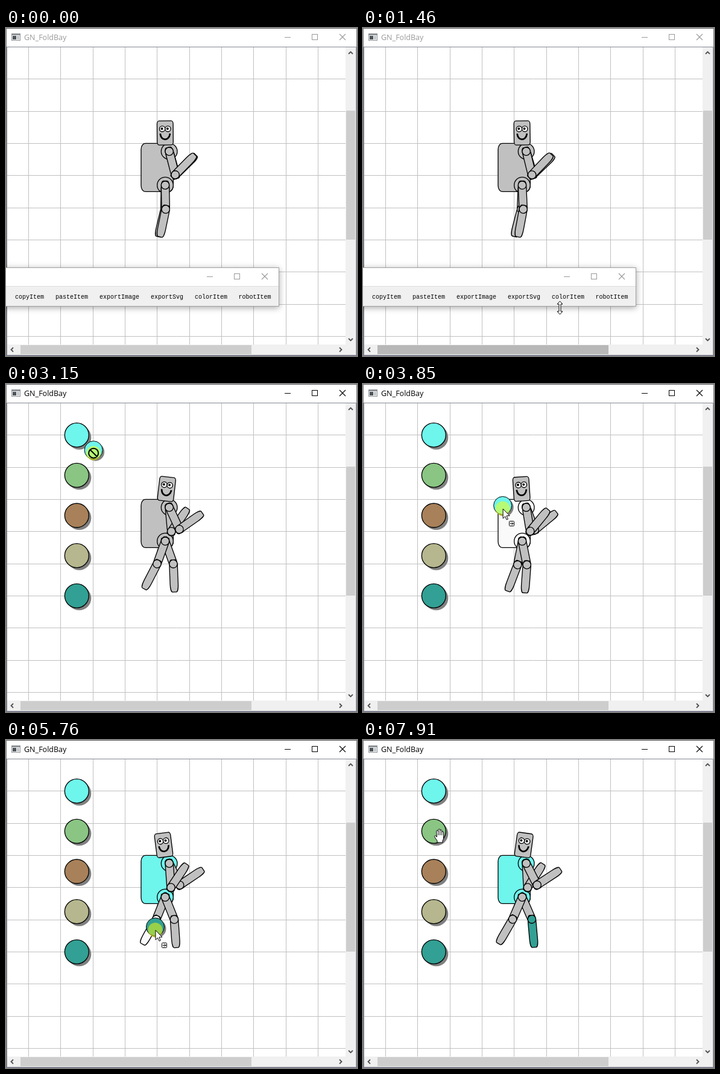
An HTML page with a canvas for the animation above (7.99 s loop, 582 px wide and 544 px high).

```html
<!DOCTYPE html>
<html lang="en">
<head>
<meta charset="utf-8">
<title>Robot</title>
<style>
html, body { margin: 0; width: 100%; height: 100%; overflow: hidden; background: #fff; }
canvas { display: block; width: 582px; height: 544px; }
</style>
</head>
<body>
<canvas id="stage"></canvas>
<script>
const W = 582, H = 544, LOOP = 7990, STEP = 76.83;
const TAU = Math.PI * 2, SCALE = 4 / 3, CX = 250.667, CY = 218;
const GREY = '#c0c0c0', LIT = '#fafafa';
const PALETTE = ['#6ef5ec', '#8ac584', '#a8815a', '#b6b78e', '#32a094'];
const T = { click: 1900, colors: 2000, front: 2850, drag1: 3000, drop1: 4010,
            press2: 5120, drag2: 5250, drop2: 5880 };

// time, walk cycles
const WALK = [[0, -1.756], [1460, -.763], [2540, -.03], [3850, .816],
              [5760, 2.1175], [7060, 3.02], [7910, 3.605], [7990, 3.66]];
// time, pointer x, pointer y
const POINTER = [[980, 300, 565], [1150, 310, 535], [1300, 322, 480], [1460, 326.5, 464],
  [1650, 328, 462], [1850, 340, 447], [2050, 340, 447], [2540, 138, 198], [2850, 122, 92],
  [3000, 120, 88], [3400, 187, 159], [3850, 232.5, 207.5], [4220, 232.5, 212], [4950, 120, 355],
  [5200, 120, 355], [5700, 247, 314], [5760, 247.5, 315], [5850, 247.5, 315], [5960, 231, 319],
  [6830, 231, 319], [7600, 146, 116], [7750, 123, 103], [7910, 126, 156]];

const HAND = new Path2D('M5 23L5 20L1.5 15Q-.5 12 1.5 11.5Q3 11.5 4.5 14L3.8 5Q3.8 2.8 5.2 2.8Q6.6 2.8 6.8 5' +
  'L6.8 2.5Q7 .7 8.3 .7Q9.7 .7 9.7 2.5L9.9 3.5Q10 1.8 11.2 1.8Q12.7 1.8 12.7 4L12.8 6Q13 4.6 14.2 4.6' +
  'Q15.6 4.6 15.6 7L15.6 15Q15.5 18 14 20L14 23Z');
const FINGERS = new Path2D('M6.9 5V11M9.8 3.5V11M12.8 6V11');
const ARROW = new Path2D('M.5 .5V16.5L4 13L6.5 18.5L8.8 17.5L6.4 12H11.5Z');
const RESIZE = new Path2D('M0 -11L4.5 -6H1.5V6H4.5L0 11L-4.5 6H-1.5V-6H-4.5Z');

const canvas = document.getElementById('stage');
const ctx = canvas.getContext('2d');
const dpr = window.devicePixelRatio || 1;
canvas.width = W * dpr;
canvas.height = H * dpr;

const mix = (a, b, k) => a + (b - a) * k;
const clamp = v => Math.max(0, Math.min(1, v));

function sample(keys, t) {
  let i = 0;
  while (i < keys.length - 2 && keys[i + 1][0] <= t) i++;
  const a = keys[i], b = keys[i + 1], k = clamp((t - a[0]) / (b[0] - a[0]));
  return a.slice(1).map((v, j) => mix(v, b[j + 1], k));
}

function rect(x, y, w, h, color) {
  ctx.fillStyle = color;
  ctx.fillRect(x, y, w, h);
}

function lines(color, width, ...paths) {
  ctx.strokeStyle = color;
  ctx.lineWidth = width;
  ctx.beginPath();
  for (const p of paths)
    for (let i = 0; i < p.length; i += 2) ctx[i ? 'lineTo' : 'moveTo'](p[i], p[i + 1]);
  ctx.stroke();
}

function oval(x, y, r, fill, stroke = true) {
  ctx.beginPath();
  ctx.arc(x, y, r, 0, TAU);
  ctx.fillStyle = fill;
  ctx.fill();
  if (stroke) ctx.stroke();
}

function box(x, y, w, h, rx, ry, fill) {
  ctx.beginPath();
  ctx.roundRect(x, y, w, h, { x: rx, y: ry });
  ctx.fillStyle = fill;
  ctx.fill();
  ctx.stroke();
}

function placed(x, y, angle, draw) {
  ctx.save();
  ctx.translate(x, y);
  ctx.rotate(angle * Math.PI / 180);
  draw();
  ctx.restore();
}

function blackPen() {
  ctx.strokeStyle = '#000';
  ctx.lineWidth = 1;
}

function windowButtons(x, y, color) {
  lines(color, 1, [x, y + .5, x + 10, y + .5]);
  ctx.strokeRect(x + 45.5, y - 4.5, 9, 9);
  lines(color, 1.1, [x + 91, y - 5, x + 101, y + 5], [x + 101, y - 5, x + 91, y + 5]);
}

function frame(active, hover) {
  rect(0, 0, W, H, '#fff');
  rect(9, 9, 15, 12, '#8c9196');
  rect(10, 12, 13, 8, '#f4f4f4');
  rect(11, 13, 6, 6, '#4c5358');
  rect(18, 13, 4, 6, '#c4c8cc');
  ctx.font = '12.5px "Open Sans", sans-serif';
  ctx.fillStyle = active ? '#000' : '#999';
  ctx.fillText('GN_FoldBay', 30, 20);
  windowButtons(462, 15, active ? '#000' : '#999');

  ctx.beginPath();
  for (let x = 37; x < 563; x += 160 / 3) { ctx.moveTo(Math.floor(x + .34) + .5, 32); ctx.lineTo(Math.floor(x + .34) + .5, 525); }
  for (let y = 84.67; y < 525; y += 160 / 3) { ctx.moveTo(2, Math.floor(y) + .5); ctx.lineTo(563, Math.floor(y) + .5); }
  ctx.strokeStyle = GREY;
  ctx.lineWidth = 1;
  ctx.stroke();

  rect(563, 32, 17, 510, '#f0f0f0');
  rect(2, 525, 578, 17, '#f0f0f0');
  rect(564, 137, 15, 214, '#cdcdcd');
  const g = Math.round(mix(205, 166, hover));
  rect(24, 526, 383, 15, `rgb(${g},${g},${g})`);
  lines('#505050', 1.8, [568, 43, 571.5, 39.5, 575, 43], [568, 515, 571.5, 518.5, 575, 515],
    [12, 530, 8.5, 533.5, 12, 537], [553, 530, 556.5, 533.5, 553, 537]);

  rect(1, 31, 580, 1, '#828790');
  rect(1, 31, 1, 512, '#828790');
  rect(580, 31, 1, 512, '#a0a3aa');
  rect(1, 542, 580, 1, '#a0a3aa');
  rect(0, 0, W, 1, '#55555a');
  rect(0, 0, 1, H, '#77777c');
  rect(581, 0, 1, H, '#77777c');
  rect(0, 543, W, 1, '#6a6a80');
}

function colorDot(x, y, color) {
  oval(x + 3, y + 3, 15, '#808080', false);
  blackPen();
  oval(x, y, 15, color);
}

function limb(color, extra) {
  box(-5, -5, 40, 10, 10, 2.5, color);
  oval(0, 0, 5, color);
  if (extra) extra();
}

function jointed(x, y, angle, bend, lowerColor = GREY) {
  placed(x, y, angle, () => limb(GREY, () => placed(30, 0, bend, () => limb(lowerColor))));
}

function head() {
  box(-10, -30, 20, 30, 2.5, 3.75, GREY);
  oval(-3.5, -20, 3.5, '#fff');
  oval(3.5, -20, 3.5, '#fff');
  oval(-4, -20.3, 1.5, '#000', false);
  oval(3, -20.3, 1.5, '#000', false);
  ctx.lineWidth = 2;
  ctx.lineCap = 'square';
  ctx.beginPath();
  ctx.ellipse(0, -14.5, 6, 7.5, 0, 10 * Math.PI / 180, 170 * Math.PI / 180);
  ctx.stroke();
  ctx.lineCap = 'butt';
}

function robot(u, torso, shin) {
  blackPen();
  box(-20, -20, 40, 60, 5, 7.5, torso);
  oval(15, -10, 10, torso);
  oval(10, 32, 10, torso);
  placed(10, -18, mix(-10, 10, u), head);
  blackPen();
  jointed(15, -10, mix(60, 90, u), mix(-90, -150, u));
  jointed(15, -10, mix(90, 60, u), mix(-150, -90, u));
  jointed(10, 32, mix(120, 60, u), mix(5, 20, u), shin);
  jointed(10, 32, mix(60, 120, u), mix(20, 5, u));
}

function toolbar(active) {
  ctx.save();
  ctx.shadowColor = active ? 'rgba(0,0,0,.5)' : 'rgba(0,0,0,.35)';
  ctx.shadowBlur = (active ? 18 : 10) * dpr;
  ctx.shadowOffsetY = (active ? 4 : 2) * dpr;
  rect(-60, 397, 513, 65, active ? '#6c6c6c' : '#a0a0a0');
  ctx.restore();
  rect(-60, 398, 512, 30, '#fff');
  rect(-60, 428, 512, 1, '#dcdcdc');
  rect(-60, 429, 512, 32, '#f0f0f0');
  windowButtons(333, 412, active ? '#000' : '#999');
  ctx.font = '10px "Liberation Mono", monospace';
  ctx.fillStyle = '#000';
  const labels = { copyItem: 15, pasteItem: 82, exportImage: 155, exportSvg: 240, colorItem: 313, robotItem: 385.5 };
  for (const name in labels) ctx.fillText(name, labels[name], 449);
}

function glyph(path, x, y) {
  ctx.save();
  ctx.translate(x, y);
  ctx.fillStyle = '#fff';
  blackPen();
  ctx.fill(path);
  ctx.stroke(path);
  if (path === HAND) ctx.stroke(FINGERS);
  ctx.restore();
}

function pointer(t, x, y, dragging, accepted) {
  const overDot = t >= T.colors && PALETTE.some((_, i) => {
    const dx = x - 117.33, dy = y - 84.67 - i * 200 / 3;
    return dx > -20.7 && dx < 24.7 && dy > -20.7 && dy < 24.7;
  });
  if (dragging && !accepted) {
    blackPen();
    ctx.lineWidth = 2;
    ctx.beginPath();
    ctx.arc(x, y, 8, 0, TAU);
    ctx.moveTo(x - 5.6, y - 5.6);
    ctx.lineTo(x + 5.6, y + 5.6);
    ctx.stroke();
  } else if (dragging) {
    glyph(ARROW, x, y);
    const bx = Math.round(x + 10.5) + .5, by = Math.round(y + 20.5) + .5;
    ctx.fillStyle = '#fff';
    blackPen();
    ctx.beginPath();
    ctx.roundRect(bx, by, 8, 8, 1);
    ctx.fill();
    ctx.stroke();
    lines('#000', 1, [bx + 1.5, by + 4, bx + 6.5, by + 4], [bx + 4, by + 1.5, bx + 6.5, by + 4, bx + 4, by + 6.5]);
  } else if (overDot) {
    glyph(HAND, x - 8, y - 9);
  } else if (t < T.click && y > 458 && y < 470) {
    glyph(RESIZE, x, y);
  } else {
    glyph(ARROW, x, y);
  }
}

function draw(t) {
  ctx.setTransform(dpr, 0, 0, dpr, 0, 0);
  const between = (a, b) => t >= a && t < b;
  const [cycle] = sample(WALK, t);
  const u = (1 - Math.cos(TAU * cycle)) / 2;
  const [x, y] = sample(POINTER, t);
  const first = between(T.drag1, T.drop1), second = between(T.drag2, T.drop2);
  const onTorso = first && x > 224 && x < 277 && y > 191 && y < 271;
  const onShin = second && t > 5640;
  const torso = onTorso ? LIT : t >= T.drop1 ? PALETTE[0] : GREY;
  const shin = onShin ? LIT : t >= T.drop2 ? PALETTE[4] : GREY;
  const hover = clamp((t - 1080) / 150) * clamp((1620 - t) / 300);

  frame(t >= T.front, hover);
  ctx.save();
  ctx.translate(CX, CY);
  ctx.scale(SCALE, SCALE);
  if (t >= T.colors) PALETTE.forEach((c, i) => colorDot(-100, -100 + i * 50, c));
  robot(u, torso, shin);
  ctx.restore();

  if (t < T.front) toolbar(t >= T.click);
  if (t < POINTER[0][0]) return;
  if (first || second) colorDot(x, y - 5, PALETTE[first ? 0 : 4]);
  if (between(T.click, T.colors) || between(T.front, T.drop1) || between(T.press2, T.drop2))
    oval(x, y, 12, 'rgba(255,255,0,.5)', false);
  pointer(t, x, y, first || second, onTorso || onShin);
}

const start = performance.now();
function tick() {
  const t = (performance.now() - start) % LOOP;
  draw(Math.floor((t + 8) / STEP) * STEP);
  requestAnimationFrame(tick);
}
tick();
</script>
</body>
</html>
```
